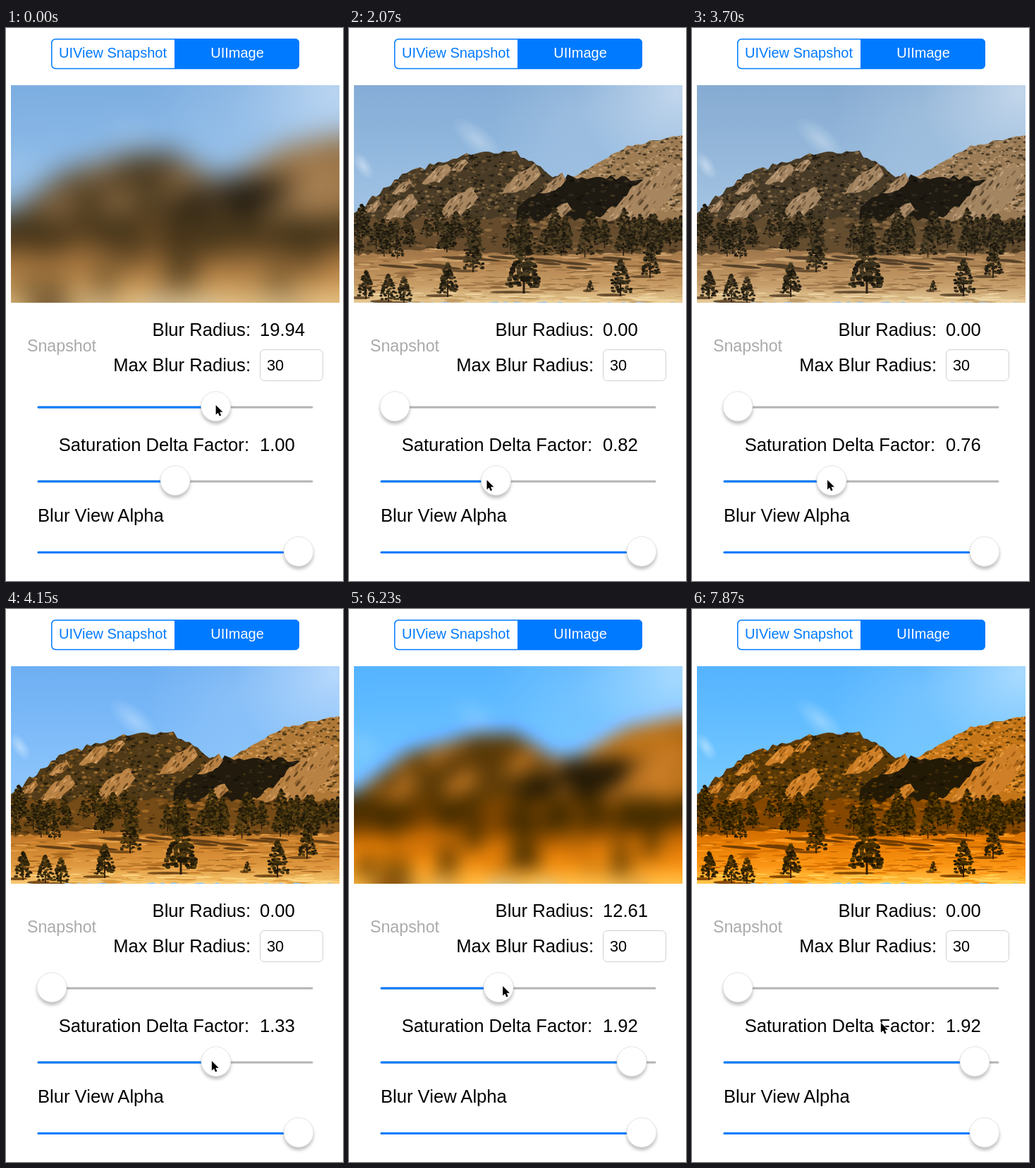
Write an HTML page with a canvas that moves like this. It is 478 px wide and 783 px high and loops after 8000 ms.

```html
<!DOCTYPE html>
<html lang="en">
<head>
<meta charset="utf-8">
<title>Blur controls</title>
<style>
html, body { margin: 0; width: 100%; height: 100%; overflow: hidden; background: #fff; }
#frame { position: absolute; left: 7px; top: 81px; width: 466px; height: 308px; overflow: hidden; }
#photo { position: absolute; left: -90px; top: -90px; }
svg { position: absolute; left: 0; top: 0; }
text { font: 25.6px "Liberation Sans", Arial, sans-serif; }
.end { text-anchor: end; }
.mid { text-anchor: middle; font-size: 20px; }
.track, .fill { stroke: #b4b4b4; stroke-width: 3; stroke-linecap: round; }
.fill { stroke: #007aff; }
.thumb { fill: #fff; stroke: #d8d8d8; stroke-width: .7; filter: drop-shadow(0 4px 2px rgba(0,0,0,.24)); }
</style>
</head>
<body>
<div id="frame"><canvas id="photo"></canvas></div>
<svg id="ui" width="478" height="783">
  <path d="M239 15H410a6 6 0 0 1 6 6V52a6 6 0 0 1-6 6H239Z" fill="#007aff"/>
  <rect x="64.75" y="15.75" width="350.5" height="41.75" rx="5.5" fill="none" stroke="#007aff" stroke-width="1.5"/>
  <text class="mid" x="151.5" y="42" fill="#007aff">UIView Snapshot</text>
  <text class="mid" x="328" y="42" fill="#fff">UIImage</text>

  <text x="30" y="458" style="font-size:23.2px" fill="#aaa">Snapshot</text>
  <text class="end" x="347" y="436">Blur Radius:</text>
  <text id="blurText" x="360" y="436"></text>
  <text class="end" x="347" y="486">Max Blur Radius:</text>
  <rect x="360.5" y="455.5" width="89" height="44" rx="6" fill="#fff" stroke="#d0d0d0"/>
  <text x="370" y="485" style="font-size:21.6px">30</text>
  <text class="end" x="345" y="599">Saturation Delta Factor:</text>
  <text id="satText" x="360" y="599"></text>
  <text x="45" y="699">Blur View Alpha</text>
</svg>
<script>
const W = 466, H = 308, PAD = 90, LEFT = 7, TOP = 81, RIGHT = LEFT + W, BOTTOM = TOP + H;
const $ = id => document.getElementById(id);

// ---- Landscape, in stage coordinates ----
const scene = document.createElement('canvas');
scene.width = W;
scene.height = H;
const c = scene.getContext('2d');
c.translate(-LEFT, -TOP);

let seed = 7;
const rnd = () => (seed = seed * 16807 % 2147483647) / 2147483647;
const between = (a, b) => a + rnd() * (b - a);
const pick = list => list[Math.floor(rnd() * list.length)];

function vertical(y0, y1, ...colors) {
  const g = c.createLinearGradient(0, y0, 0, y1);
  colors.forEach((color, i) => g.addColorStop(i / (colors.length - 1), color));
  return g;
}

function blob(x, y, rx, ry, color, turn = 0) {
  c.fillStyle = color;
  c.beginPath();
  c.ellipse(x, y, rx, ry, turn, 0, 7);
  c.fill();
}

function glow(x, y, r, alpha, stretch = 1, turn = 0) {
  c.save();
  c.translate(x, y);
  c.rotate(turn);
  c.scale(1, stretch);
  const g = c.createRadialGradient(0, 0, 0, 0, 0, r);
  g.addColorStop(0, `rgba(225,238,252,${alpha})`);
  g.addColorStop(1, 'rgba(225,238,252,0)');
  c.fillStyle = g;
  c.fillRect(-r, -r, 2 * r, 2 * r);
  c.restore();
}

// Fills a polygon whose sides are broken up at random.
function jagged(points, rough, fill) {
  const path = new Path2D();
  points.forEach(([x, y], i) => {
    const [nx, ny] = points[(i + 1) % points.length];
    const n = Math.ceil(Math.hypot(nx - x, ny - y) / 7);
    for (let j = 0; j < n; j++)
      path.lineTo(x + (nx - x) * j / n, y + (ny - y) * j / n + between(-rough, rough));
  });
  c.fillStyle = fill;
  c.fill(path);
  return path;
}

function speckle(path, n, [x0, y0, x1, y1], rx, ry, colors, turn = 0) {
  c.save();
  c.clip(path);
  for (let i = 0; i < n; i++) {
    const s = between(.4, 1.4);
    blob(between(x0, x1), between(y0, y1), rx * s, ry * s, pick(colors), turn);
  }
  c.restore();
}

const leaves = ['#2b2311', '#3d3116', '#1d180c', '#54421f'];
const stone = ['#b58c5d', '#8c673f', '#c79f70', '#a27a4b', '#5f4628'];

function tree(x, base, h) {
  c.fillStyle = '#2a1d10';
  c.fillRect(x - h * .02, base - h * .5, h * .04, h * .5);
  for (let i = 0; i < h * 2.4; i++) {
    const t = rnd(), w = h * .33 * Math.pow(t, .7);
    blob(x + between(-w, w), base - h + t * h * .88, .8 + h * .035, .7 + h * .02, pick(leaves));
  }
}

// A rock slab leaning to the right.
function slab(x, y, s) {
  const at = (u, v) => [x + u * s, y - v * s];
  const rock = jagged([at(0, 0), at(.35, .45), at(.85, .75), at(1, .5), at(.6, .1)], 2, '#ad8456');
  speckle(rock, s * 2, [x, y - s, x + s, y], 4, 1.2, stone, -.9);
}

c.fillStyle = vertical(81, 240, '#7cade0', '#88b7e6', '#97c2eb');
c.fillRect(LEFT, TOP, W, H);
glow(465, 90, 140, .65);
glow(330, 120, 130, .2);
glow(182, 158, 44, .4, .42, .7);
glow(20, 195, 22, .55, .5, 1);

const hill = jagged([[300, 222], [350, 192], [395, 168], [RIGHT, 150], [RIGHT, 300], [320, 300]], 2, '#a37a49');
speckle(hill, 800, [320, 150, RIGHT, 260], 2.6, 1.4, ['#4a3920', '#b78c5a', '#68502d', '#c69b68']);

const ridge = jagged([[LEFT, 263], [75, 206], [160, 182], [232, 174], [300, 215], [335, 300], [LEFT, 300]], 4, '#4c3b20');
speckle(ridge, 1400, [LEFT, 172, 335, 300], 2.4, 1.5, ['#241e10', '#56442a', '#78592f', '#33291a', '#8c6a3e']);

const shade = jagged([[240, 250], [310, 211], [420, 213], [400, 240], [345, 272], [235, 285]], 4, '#1f1a10');
speckle(shade, 200, [235, 205, 425, 285], 3, 1.5, ['#14110a', '#30271a', '#453619']);

for (const [x, y, size] of [
  [20, 263, 26], [60, 236, 30], [46, 273, 52], [103, 222, 42], [145, 203, 24],
  [120, 273, 64], [214, 236, 58], [270, 235, 38], [274, 277, 42], [362, 277, 115]
]) slab(x, y, size);

const woods = jagged([[LEFT, 270], [RIGHT, 270], [RIGHT, 335], [LEFT, 335]], 4, '#6b4b25');
speckle(woods, 500, [LEFT, 264, RIGHT, 335], 4, 1.6, ['#37291400', '#3a2b15', '#7d592c', '#946a36', '#4c3619']);

const meadow = jagged([[LEFT, 322], [120, 312], [240, 322], [RIGHT, 318], [RIGHT, BOTTOM], [LEFT, BOTTOM]], 2,
  vertical(310, BOTTOM, '#a5713a', '#bd8646', '#cf9a57', '#edc988'));
speckle(meadow, 420, [LEFT, 312, RIGHT, 374], 11, 1, ['#ad773d', '#c98f4d', '#94652f', '#d8a564']);
speckle(meadow, 120, [LEFT, 374, RIGHT, BOTTOM], 11, 1, ['#e0b56e', '#f3d596', '#cb9b57']);
for (let i = 0; i < 14; i++) blob(between(60, 450), between(322, 340), between(15, 40), 2, '#5c4020', .08);

for (let i = 0; i < 62; i++) tree(LEFT + rnd() * W, 290 + i * .6, between(26, 44));

// Trees that stand alone on the meadow
for (const [x, base, h] of [
  [176, 346, 48], [427, 354, 44], [385, 380, 52], [140, 381, 48], [248, 376, 74],
  [24, 384, 40], [56, 389, 40], [78, 391, 38], [342, 374, 16]
]) {
  blob(x - h * .25, base - 2, h * .4, 2, '#6e4d27');
  tree(x, base, h);
}

// Repeat the borders outward so that the blur has no pale rim.
const photo = $('photo');
const fullW = photo.width = W + 2 * PAD, fullH = photo.height = H + 2 * PAD;
const p = photo.getContext('2d');
p.drawImage(scene, PAD, PAD);
p.drawImage(scene, 0, 0, 1, H, 0, PAD, PAD, H);
p.drawImage(scene, W - 1, 0, 1, H, PAD + W, PAD, PAD, H);
p.drawImage(photo, 0, PAD, fullW, 1, 0, 0, fullW, PAD);
p.drawImage(photo, 0, PAD + H - 1, fullW, 1, 0, PAD + H, fullW, PAD);

// ---- Controls ----
function add(tag, attrs) {
  const el = document.createElementNS('http://www.w3.org/2000/svg', tag);
  for (const name in attrs) el.setAttribute(name, attrs[name]);
  return $('ui').appendChild(el);
}

const thumbX = value => 65 + 350 * value;

function slider(y) {
  add('line', { class: 'track', x1: 46, x2: 434, y1: y, y2: y });
  const fill = add('line', { class: 'fill', x1: 46, y1: y, y2: y });
  const thumb = add('circle', { class: 'thumb', cy: y - 1.3, r: 21 });
  return value => {
    fill.setAttribute('x2', thumbX(value));
    thumb.setAttribute('cx', thumbX(value));
  };
}

const setBlur = slider(537), setSat = slider(642);
slider(742.5)(1);
const pointer = add('path', {
  d: 'M0 0V13.5L3.1 10.7L5.2 15.6L7.5 14.6L5.5 9.8H9.8Z',
  stroke: '#fff', 'stroke-width': 1.6, 'paint-order': 'stroke'
});

// ---- Motion, in steps of the loop ----
const LOOP = 8000, STEPS = 54;
const start = performance.now();
const mix = (a, b, t) => a + (b - a) * t;

function draw() {
  const time = (performance.now() - start) % LOOP;
  const step = Math.min(STEPS - 1, Math.floor((time + 10) * STEPS / LOOP));
  const ramp = (from, to) => Math.min(1, Math.max(0, (step - from) / (to - from)));

  const blur = 19.94 * (1 - ramp(0, 5)) + 17.65 * (ramp(37, 44) - ramp(45, 50));
  const sat = 1 - ramp(13, 18.556) + 1.92 * ramp(21, 31.1);

  // The pointer follows the dragged thumb, slips off to the left, or changes slider.
  const off = ramp(4, 6) - ramp(8, 12) + ramp(49, 51);
  const onSat = ramp(8, 12) - ramp(32, 36.3);
  const leave = ramp(52, 53);
  const blurX = thumbX(blur / 30) + 6 * ramp(36, 42) - 40 * off;
  const satX = thumbX(sat / 2) - 13 + 7 * ramp(14, 25);
  const x = mix(mix(blurX, satX, onSat), 268, leave);
  const y = mix(mix(534 + 10 * off, 640, onSat), 586, leave);

  photo.style.filter = `blur(${blur}px) saturate(${sat})`;
  $('blurText').textContent = blur.toFixed(2);
  $('satText').textContent = sat.toFixed(2);
  setBlur(blur / 30);
  setSat(sat / 2);
  pointer.setAttribute('transform', `translate(${x} ${y})`);
  requestAnimationFrame(draw);
}
draw();
</script>
</body>
</html>
```
